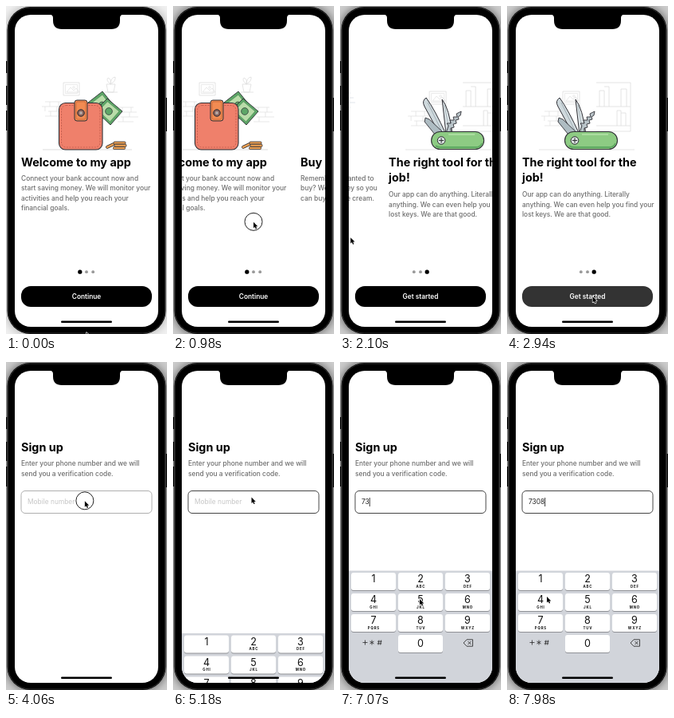
Animation of 202x411 px, one loop 8000 ms. Source, as an HTML page with a canvas:

```html
<!DOCTYPE html>
<html lang="en">
<head>
<meta charset="utf-8">
<title>Onboarding and sign up</title>
<style>
  html, body { margin: 0; width: 100%; height: 100%; overflow: hidden; background: #fff; }
  canvas { display: block; width: 202px; height: 411px; }
</style>
</head>
<body>
<canvas id="stage"></canvas>
<script>
const W = 202, H = 411, LOOP = 8000, STEP = 70, PAGE = 180;
const canvas = document.getElementById('stage');
const ctx = canvas.getContext('2d');
const scale = window.devicePixelRatio || 1;
canvas.width = W * scale;
canvas.height = H * scale;

const INK = '#303036', FAINT = '#dedede';
const DIGITS = '7308';
const TYPED = [6160, 6720, 7210, 7630];
const PRESSED_KEYS = [3, 1, 4, 1];

// Tracks: [time, value, ...]
const CURSOR = [
  [0, 101, 409], [490, 135, 133], [630, 135, 133], [770, 140, 270], [870, 140, 270],
  [1120, 45, 272], [1190, 45, 272], [1540, 123, 279], [1640, 123, 279], [1960, 6, 284],
  [2030, 6, 284], [2450, 104, 367], [2520, 107.5, 364], [3640, 107.5, 364],
  [3850, 99, 176], [3990, 99, 176], [4200, 98.5, 169.5], [5600, 98.5, 169.5],
  [5740, 66, 190], [6020, 43, 308], [6160, 42, 298], [6370, 42, 298],
  [6650, 101, 271], [6850, 101, 271], [7000, 100, 297], [7300, 100, 297],
  [7510, 102, 272], [7750, 102, 272], [7980, 50, 294]
];
const SCROLL = [
  [0, 0], [870, 0], [1120, 95], [1400, 180], [1610, 180], [1680, 182],
  [1960, 295], [2310, 360]
];
const HOLDS = [[840, 1150], [1610, 1990], [2660, 2800], [4060, 4190]]
  .concat(TYPED.map(t => [t - 70, t + 50]));

const clamp = v => Math.max(0, Math.min(1, v));
const ramp = (t, a, b) => clamp((t - a) / (b - a));
const mix = (a, b, p) => a + (b - a) * p;
const gray = v => `rgb(${v},${v},${v})`;

function track(keys, t) {
  const i = keys.findIndex(k => k[0] > t);
  if (i < 0) return keys[keys.length - 1].slice(1);
  const a = keys[i - 1], b = keys[i];
  const u = ramp(t, a[0], b[0]), p = u * u * (3 - 2 * u);
  return a.slice(1).map((v, n) => mix(v, b[n + 1], p));
}

function paint(path, fill, stroke, width = 1) {
  if (fill) { ctx.fillStyle = fill; ctx.fill(path); }
  if (stroke) { ctx.strokeStyle = stroke; ctx.lineWidth = width; ctx.stroke(path); }
}
const draw = (d, fill, stroke, width) => paint(new Path2D(d), fill, stroke, width);

function box(x, y, w, h, r, fill, stroke, width) {
  const p = new Path2D();
  p.roundRect(x, y, w, h, r);
  paint(p, fill, stroke, width);
}

function disc(x, y, r, fill, stroke, width) {
  const p = new Path2D();
  p.arc(x, y, r, 0, Math.PI * 2);
  paint(p, fill, stroke, width);
}

function text(str, x, y, size, weight, color, align = 'left') {
  ctx.font = `${weight} ${size}px Inter, Roboto, sans-serif`;
  ctx.textAlign = align;
  ctx.fillStyle = color;
  ctx.fillText(str, x, y);
}

const title = (lines, y) => lines.forEach((s, i) => text(s, 19, y + i * 19.5, 14.4, 700, '#000'));
const body = (lines, y) => lines.forEach((s, i) => text(s, 19, y + i * 12.5, 8.4, 500, '#6d6d6d'));

function picture(x, y, w, h, color) {
  box(x, y, w, h, 0, null, color, 0.8);
  box(x + 2.5, y + 2.5, w - 5, h - 5, 0, null, color, 0.6);
  draw(`M${x + 4} ${y + h - 4} l5 -6 l4 4 l3 -3 l4 5 z`, null, color, 0.7);
  disc(x + w - 7, y + 6, 1.3, null, color, 0.6);
}

function bricks(x, y, color) {
  draw(`M${x} ${y}h20m-24 6h28m-20 6h22m-26 6h20
    M${x + 6} ${y}v6m9 0v6m-8 0v6m-7 -12v6m17 -12v6`, null, color, 0.7);
}

function bill(d, x, y) {
  draw(d, '#5da667', INK, 0.9);
  ctx.save();
  ctx.translate(x, y);
  ctx.scale(0.76, 0.76);
  ctx.translate(-x, -y);
  draw(d, '#b9dda9', '#40814f', 0.7);
  ctx.restore();
  disc(x, y, 4.4, '#5da667', INK, 0.7);
}

function wallet() {
  picture(72, 96, 20, 16, FAINT);
  bricks(49, 120, FAINT);
  bricks(140, 127, FAINT);
  draw('M124 108h16M126 98h11l-2 10h-7zM131 98q-6 -5 -3 -8q5 2 3 8q0 -8 6 -9q1 5 -6 9', null, FAINT, 0.8);
  draw('M46 180H158', null, '#cfcfcf', 0.7);
  bill('M103 121L121 107L138 128L120 142Z', 120.5, 124.5);
  bill('M112 131L127 116L146 132L131 149Z', 129, 132);
  box(66.5, 121.5, 54.5, 58.5, 8, '#ef806b', INK, 1.1);
  ctx.setLineDash([2, 1.5]);
  box(69.5, 124.5, 48.5, 52.5, 6, null, '#b94f43', 0.7);
  ctx.setLineDash([]);
  box(86, 118, 16, 26, 3, '#f18b52', INK, 1);
  box(88, 120, 12, 22, 2, null, '#bd5b31', 0.6);
  disc(94, 134, 4.3, '#8b625b', INK, 1);
  disc(94, 134, 2, '#b6aaa6');
  [[125, 176, -25], [135, 170, 0], [136, 173.2, 0], [134.5, 176.4, 0]].forEach(([x, y, a]) => {
    ctx.save();
    ctx.translate(x, y);
    ctx.rotate(a * Math.PI / 180);
    box(0, 0, a ? 11 : 15, 3.2, 1.2, '#eda052', INK, 0.8);
    ctx.restore();
  });
}

function iceCream() {
  const line = '#d5dae2';
  picture(89, 86, 23, 18, line);
  bricks(131, 109, line);
  draw('M74 170H132', null, line, 0.7);
  [[59, 130], [70, 151], [77, 113], [69, 138], [131, 156], [137, 136], [129, 147], [144, 139]]
    .forEach(([x, y], i) => disc(x, y, i % 3 ? 0.7 : 1, ['#cc8b77', '#9b9cab', '#dfb07e'][i % 3]));
  draw('M114 132L124 115L127 117L118 133Z', '#e8674b', INK, 0.9);
  draw('M116 128l4 1M119 123l4 1M122 118l4 2', null, '#7d2c2c', 1.2);
  draw('M85 133Q85 114 102 114Q119 114 119 133Z', '#b63438', INK, 1);
  draw('M85 130q4 6 8 1q4 6 9 1q5 6 9 0q4 5 8 -1l1 5H84z', '#ec7468', INK, 0.7);
  draw('M91 126q2 -8 8 -9', null, '#dc6260', 1.4);
  disc(102, 115, 4.2, '#d53d39', INK, 0.9);
  draw('M102 111q1 -4 5 -4', null, INK, 0.8);
  draw('M83 135H121Q121 153 107 157V162Q113 164 115 169H89Q91 164 97 162V157Q83 153 83 135Z', '#f18a24', INK, 1);
  draw('M88 140Q90 149 97 153M100 158v5', null, '#ffba54', 1.8);
  draw('M114 138Q114 149 106 154', null, '#c76418', 1.5);
  box(81.5, 133, 41, 4, 2, '#f8a03a', INK, 0.9);
}

function knife() {
  picture(70, 107, 21, 16, FAINT);
  bricks(47, 132, FAINT);
  draw('M112 96h43v61h-43M112 126h43M112 150h43M116 126v-20h6v20m0 -25h6v25M143 126v-22h7v22M138 150v-19h5v19m0 -16h6v16M40 180h120', null, FAINT, 0.8);
  draw('M83 161L64 126Q60 119 66 115Q77 130 91 161Z', '#cfd9dd', INK, 1);
  draw('M68 121L86 158', null, '#8e9da4', 0.7);
  draw('M77 161L64 145l1 -5l5 2l20 19z', '#aebcc2', INK, 0.9);
  draw('M91 161L86 117Q95 128 99 161Z', '#dbe3e6', INK, 1);
  draw('M89 124L95 157', null, '#93a1a7', 0.7);
  draw('M91 159L94 150l-2 -3l5 0l-1 -4l5 0l-1 -4l5 0l-1 -4l6 -3l-1 5l-3 2l1 3l-4 1l1 4l-4 1l1 4l-4 1l0 8z', '#b9c4c9', INK, 0.9);
  box(72.5, 157.5, 66, 22, 11, '#8dcb83', INK, 1.1);
  draw('M78 175Q80 177 84 177H128Q134 177 136 172', null, '#5ca85f', 1.8);
  draw('M94 161H127', null, '#b5e2a7', 1.4);
  disc(85, 168.5, 4.8, '#d9e1df', INK, 1);
  draw('M82 168.5h6M85 165.5v6', null, INK, 1.1);
}

const PAGES = [
  { art: wallet, title: ['Welcome to my app'], body: ['Connect your bank account now and',
    'start saving money. We will monitor your', 'activities and help you reach your', 'financial goals.'] },
  { art: iceCream, title: ['Buy cool stuff'], body: ['Remember that ice cream you wanted to',
    'buy? We will help you save money so you', 'can buy it. Trust us. We know ice cream.'] },
  { art: knife, title: ['The right tool for the', 'job!'], body: ['Our app can do anything. Literally',
    'anything. We can even help you find your', 'lost keys. We are that good.'] }
];

function onboarding(t) {
  const [scroll] = track(SCROLL, t);
  PAGES.forEach((page, i) => {
    const x = i * PAGE - scroll;
    if (Math.abs(x) >= PAGE) return;
    ctx.save();
    ctx.translate(x, 0);
    page.art();
    title(page.title, 200.5);
    body(page.body, 218.5 + (page.title.length - 1) * 20.5);
    ctx.restore();
  });
  const active = Math.round(scroll / PAGE);
  PAGES.forEach((_, i) => disc(92.8 + i * 8.2, 333.2, i === active ? 2.6 : 1.9, i === active ? '#000' : '#999'));
  const press = ramp(t, 2660, 2940);
  box(19, 351, 164, 26, 12, gray(Math.round(51 * press)));
  text(active === 2 ? 'Get started' : 'Continue', 101, 367.2, 8.3, 600, '#fff', 'center');
}

function keyboard(t) {
  const s = Math.max(0, t - 5088) * 0.0163;
  const top = 261.5 + 140.5 * (1 + s) * Math.exp(-s);
  if (top > 401.5) return;
  const letters = ['', 'ABC', 'DEF', 'GHI', 'JKL', 'MNO', 'PQRS', 'TUV', 'WXYZ'];
  const down = TYPED.findIndex(k => t >= k - 70 && t < k + 70);
  const key = (col, row, label, sub, held) => {
    const x = 14 + col * 59, y = top + 2.5 + row * 26;
    box(x, y + 1, 56, 22, 3, '#8f9196');
    box(x, y, 56, 22, 3, held ? '#b3b7c0' : '#fff');
    text(label, x + 28, y + (row === 3 ? 15 : 12.4), 12.6, 400, '#111', 'center');
    if (!sub) return;
    ctx.letterSpacing = '0.8px';
    text(sub, x + 28.4, y + 18.9, 4.4, 700, '#111', 'center');
    ctx.letterSpacing = '0px';
  };
  ctx.fillStyle = '#d1d4da';
  ctx.fillRect(11, top, 180, H - top);
  letters.forEach((sub, i) => key(i % 3, Math.floor(i / 3), String(i + 1), sub, down >= 0 && PRESSED_KEYS[down] === i));
  key(1, 3, '0', '', false);
  const y = top + 90;
  draw(`M28.5 ${y}h6m-3 -3v6M40 ${y - 3}v6m-2.6 -4.5l5.2 3m0 -3l-5.2 3M47 ${y - 1.3}h5.5m-5.8 2.6h5.5M49 ${y - 3}l-1 6m3.7 -6l-1 6`, null, '#222', 0.75);
  draw(`M155 ${y + 0.5}l4 -4.2h7.5v8.4h-7.5zM160.5 ${y - 1.5}l4 4m0 -4l-4 4`, null, '#222', 0.8);
}

function signUp(t) {
  title(['Sign up'], 112);
  body(['Enter your phone number and we will', 'send you a verification code.'], 130);
  box(19, 161.5, 164, 28, 5, '#fff', gray(Math.round(mix(175, 70, ramp(t, 4270, 4410)))), 1);
  const count = TYPED.filter(k => t >= k).length;
  const entry = DIGITS.slice(0, count);
  text(entry || 'Mobile number', 27, 178.3, 8.4, 400, entry ? '#222' : '#c6c6c6');
  const since = t - (count ? TYPED[count - 1] : 5320);
  if (since >= 0 && since % 1000 < 560) {
    ctx.fillStyle = '#222';
    ctx.fillRect(27 + ctx.measureText(entry).width, 170, 0.9, 11);
  }
  keyboard(t);
}

function device(t) {
  const focus = ramp(t, 560, 770);
  ctx.fillStyle = gray(Math.round(mix(240, 205, focus)));
  ctx.fillRect(0, 0, W, H);
  ctx.save();
  ctx.shadowColor = `rgba(0,0,0,${mix(0.3, 0.6, focus)})`;
  ctx.shadowBlur = 12 * scale;
  box(1.5, 1, 199, 410, 29, '#000');
  ctx.restore();
  ctx.fillStyle = '#111';
  [[0, 69, 15], [0, 100, 24], [0, 131, 25], [200.5, 115, 42]].forEach(([x, y, h]) => ctx.fillRect(x, y, 1.5, h));
  box(2.5, 2, 197, 408, 28, '#000', '#3a3a3a', 0.8);
}

function pointer(t) {
  const [x, y] = track(CURSOR, t);
  if (HOLDS.some(([a, b]) => t >= a && t < b)) disc(x, y - 0.5, 11, null, '#222', 1);
  ctx.save();
  ctx.translate(x, y);
  ctx.lineJoin = 'round';
  const arrow = 'M0 0V7.4L1.7 5.9L2.9 8.6L4.2 8L3 5.4H5.3Z';
  draw(arrow, null, '#fff', 1.3);
  draw(arrow, '#000');
  ctx.restore();
}

function render(t) {
  ctx.setTransform(scale, 0, 0, scale, 0, 0);
  device(t);
  ctx.save();
  ctx.beginPath();
  ctx.roundRect(11, 11, 180, 391, 20);
  ctx.clip();
  ctx.fillStyle = '#fff';
  ctx.fillRect(11, 11, 180, 391);
  if (t < 3080) onboarding(t); else signUp(t);
  box(69, 394.5, 64, 2.6, 1.3, '#000');
  ctx.restore();
  draw('M55 10.5Q59 11 59 15V18Q59 29 70 29H132Q143 29 143 18V15Q143 11 147 10.5Z', '#000');
  pointer(t);
}

function frame(now) {
  render(Math.floor((now % LOOP) / STEP) * STEP);
  requestAnimationFrame(frame);
}
requestAnimationFrame(frame);
</script>
</body>
</html>
```
